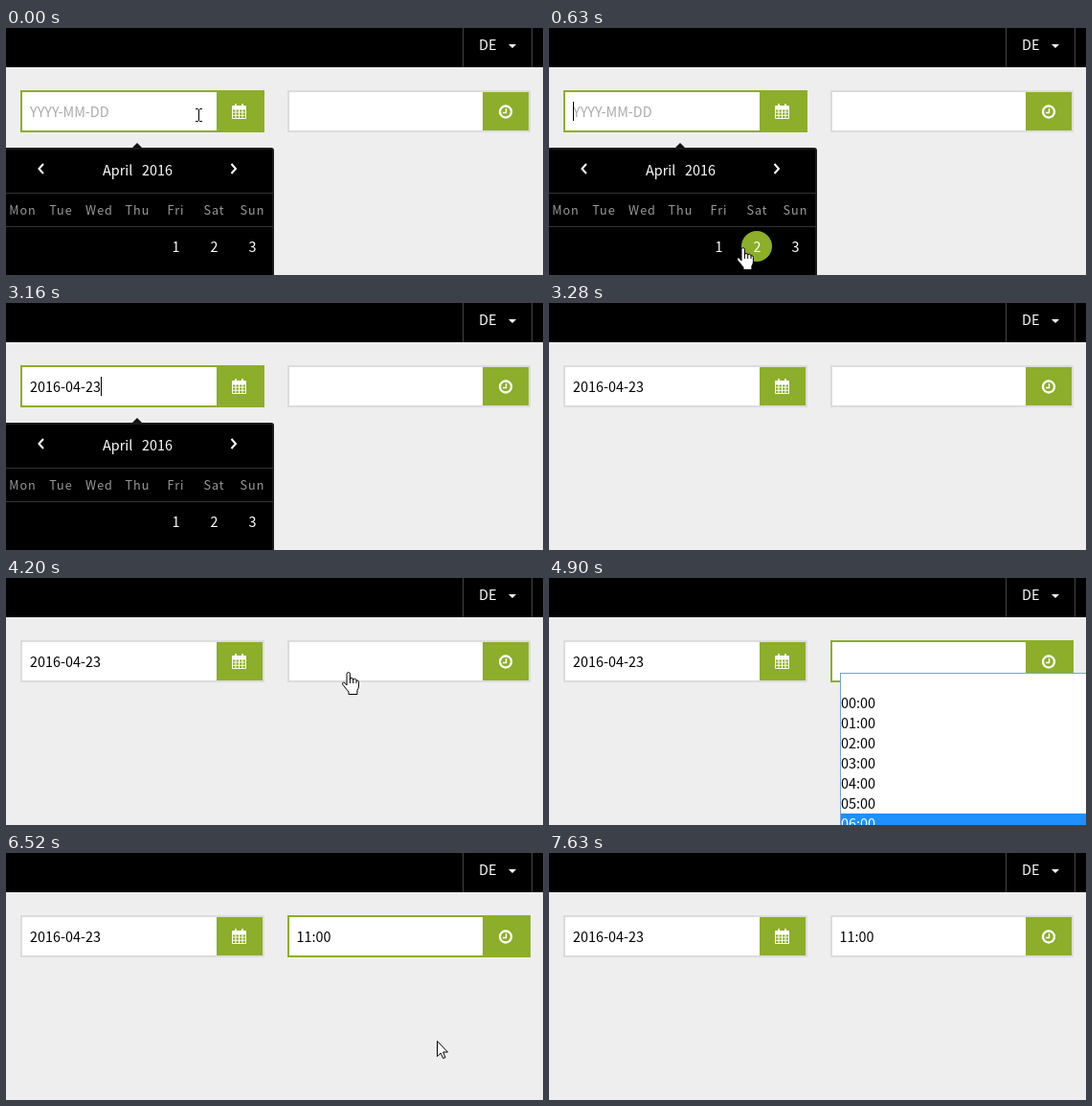
An HTML page that plays this animation: 561 px wide and 258 px high, repeating every 8000 ms.

```html
<!DOCTYPE html>
<html lang="en">
<head>
<meta charset="utf-8">
<title>Date and time picker</title>
<style>
  html, body { margin: 0; width: 100%; height: 100%; overflow: hidden; background: #eee; }
  svg { display: block; width: 561px; height: 258px; }
  text { font: 14.4px "Noto Sans CJK JP", "Noto Sans CJK SC", "Noto Sans CJK KR", "Noto Sans CJK TC", "Noto Sans", sans-serif; white-space: pre; }
  .light { fill: #fff; font-weight: 500; }
  .mid { text-anchor: middle; }
  .week { font-size: 12.6px; letter-spacing: 1px; fill: #999; }
  .green { fill: #8cae2a; }
  .cursor { fill: #fff; stroke: #000; }
</style>
</head>
<body>
<svg viewBox="0 0 561 258">
  <rect width="561" height="41"/>
  <path d="M477.5 0V41M549.5 0V41" stroke="#444"/>
  <text class="light" x="494" y="23">DE</text>
  <path d="M525 17h8l-4 4z" fill="#fff"/>

  <rect id="dateBox" x="16" y="66" width="253" height="42" fill="#fff" stroke-width="2"/>
  <rect class="green" x="220" y="67" width="48" height="40"/>
  <g fill="#fff">
    <rect x="236" y="81" width="15" height="14" rx="1"/>
    <rect x="239" y="79" width="2" height="4" rx="1"/>
    <rect x="246" y="79" width="2" height="4" rx="1"/>
  </g>
  <path d="M237 86.5h13M237 89.7h13M237 92.9h13" stroke="#8cae2a" stroke-width="2.2" stroke-dasharray="2.5 1"/>
  <text id="date" x="25" y="93"></text>
  <rect id="caret" y="77" width="1" height="20"/>

  <rect id="timeBox" x="295" y="66" width="252" height="42" fill="#fff" stroke-width="2"/>
  <rect class="green" x="498" y="67" width="48" height="40"/>
  <circle cx="522" cy="87.5" r="6" fill="none" stroke="#fff" stroke-width="2.3"/>
  <path d="M522.5 84v4.5h-3.5" fill="none" stroke="#fff" stroke-width="1.4"/>
  <text id="time" x="303.5" y="93">11:00</text>

  <g id="calendar">
    <path d="M131 126l6-6 6 6z" fill="#111"/>
    <rect x="-5" y="126" width="284" height="150" rx="2" stroke="#1a1a1a" stroke-width="2"/>
    <path d="M0 172.5H279M0 207.5H279" stroke="#333"/>
    <path d="M39 142l-4.5 5 4.5 5M235.500 142l4.500 5-4.500 5" fill="none" stroke="#fff" stroke-width="2"/>
    <text class="light" x="101" y="154">April</text>
    <text class="light" x="142" y="154">2016</text>
    <circle id="hover" class="green" cx="217" r="16"/>
  </g>

  <g id="list">
    <rect x="304.5" y="99.5" width="270" height="180" fill="#fff" stroke="#7b9fd4"/>
    <rect id="pick" x="305" width="270" height="21" fill="#1e90ff"/>
  </g>

  <path id="beam" d="M198 84.500h2.500l1 1 1-1h2.500M201.500 85v12M198 97.500h2.500l1-1 1 1h2.500" fill="none" stroke="#000"/>
  <path id="arrow" class="cursor" d="M.5 .5V16.500L4.200 13 6.600 18.500 9 17.500 6.600 12H11.500z"/>
  <g id="hand" class="cursor">
    <path d="M5 14V2.300a1.700 1.700 0 0 1 3.400 0V8q0-1.500 1.600-1.500t1.700 1.700q.2-1.200 1.700-1t1.500 1.700q2.400-.6 2.500 1.600V15q0 2.500-1.500 4.500V23.500H7V21L.9 13.500q-1-2 .6-2.600 1.300-.4 3.500 3.100z"/>
    <path d="M8.400 7v5M11.700 8v4M15 9v3" fill="none"/>
  </g>
</svg>
<script>
const $ = id => document.getElementById(id);
const LOOP = 8000, GREEN = '#8cae2a', GREY = '#dcdcdc';

function addText(parent, text, x, y, cls) {
  const el = document.createElementNS('http://www.w3.org/2000/svg', 'text');
  el.setAttribute('x', x);
  el.setAttribute('y', y);
  el.setAttribute('class', cls);
  el.textContent = text;
  return parent.appendChild(el);
}

['Mon', 'Tue', 'Wed', 'Thu', 'Fri', 'Sat', 'Sun'].forEach((day, i) => {
  addText($('calendar'), day, 17.5 + i * 40, 195, 'mid week');
  if (i > 3) addText($('calendar'), i - 3, 17.5 + i * 40, 234, 'mid light');
});
const hours = [...Array(7).keys()].map(h => addText($('list'), `0${h}:00`, 305, 136 + h * 21, ''));

// Each entry: start time, cursor shape, x, y
const cursors = [
  [0, 'beam', 0, 0], [120, 'beam', 0, 22], [250, 'arrow', 196, 149],
  [390, 'arrow', 196, 182], [510, 'hand', 196, 211], [630, 'hand', 196, 229],
  [780, 'hand', 196, 239], [910, 'hand', 196, 251], [1060],
  [3530, 'arrow', 305, 185], [3680, 'arrow', 320, 165], [3800, 'arrow', 337, 134],
  [3930, 'hand', 347, 106], [4080, 'hand', 349, 101], [4200, 'hand', 351, 98],
  [4750, 'arrow', 353, 110], [4900],
  [5960, 'arrow', 396, 220], [6100, 'arrow', 419, 208], [6230, 'arrow', 434, 200],
  [6380, 'arrow', 445, 198], [6520, 'arrow', 450, 196], [6770]
];
const blinks = [[510, 1060], [1650, 2050], [2640, 3280]];

const show = (id, on) => $(id).style.display = on ? '' : 'none';
const set = (id, name, value) => $(id).setAttribute(name, value);

function draw(t) {
  const within = (a, b) => t >= a && t < b;
  const typed = t >= 3160;

  $('date').textContent = typed ? '2016-04-23' : 'YYYY-MM-DD';
  set('date', 'fill', typed ? '#000' : '#aaa');
  set('dateBox', 'stroke', t < 3280 ? GREEN : GREY);
  show('caret', blinks.some(b => within(...b)));
  set('caret', 'x', typed ? 99 : 25);

  show('calendar', t < 3280);
  show('hover', within(510, 1220));
  set('hover', 'cy', t < 910 ? 228 : 268);

  set('timeBox', 'stroke', within(4350, 7630) ? GREEN : GREY);
  show('time', t >= 5420);
  show('list', within(4350, 5420));
  show('pick', t < 5020);
  set('pick', 'y', t < 4900 ? 100 : 246);
  hours[6].setAttribute('fill', within(4900, 5020) ? '#fff' : '#000');

  const [, shape, x, y] = cursors.findLast(c => t >= c[0]);
  for (const id of ['beam', 'arrow', 'hand']) show(id, id === shape);
  if (shape) set(shape, 'transform', `translate(${x} ${y})`);
}

const start = performance.now();
function tick() {
  draw((performance.now() - start) % LOOP);
  requestAnimationFrame(tick);
}
tick();
</script>
</body>
</html>
```
